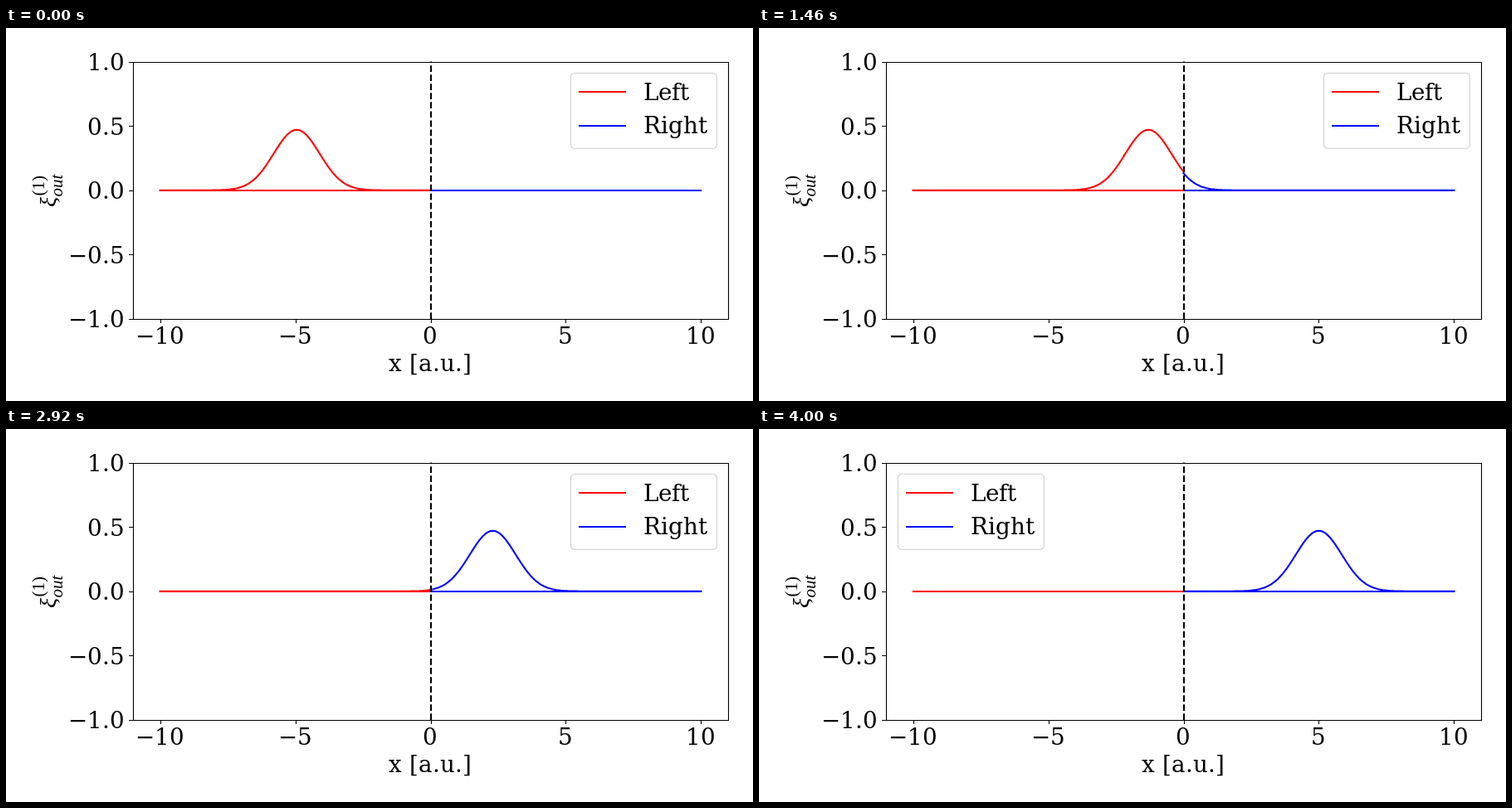
Recreate the animation shown at these times as an HTML page. Size 900 px wide and 450 px high, loop 4.02 s.

```html
<!DOCTYPE html>
<html lang="en">
<head>
<meta charset="utf-8">
<title>Travelling pulse</title>
<style>
html, body { margin: 0; width: 100%; height: 100%; overflow: hidden; background: #fff; }
svg { display: block; }
text { font: 27.78px "DejaVu Serif", "Noto Serif", serif; }
.math text { font-family: "Liberation Serif", serif; font-size: 21px; }
.math .italic { font-style: italic; }
.math .symbol { font-size: 28px; }
.line { fill: none; stroke-width: 2.08; stroke-linecap: square; stroke-linejoin: round; }
.flat { stroke-width: 2; }
.red { stroke: #f00; }
.blue { stroke: #00f; }
</style>
</head>
<body>
<svg width="900" height="450" viewBox="0 0 900 450">
  <path class="line flat red" d="M186 196H512"/>
  <path id="left" class="line red"/>
  <path class="line flat blue" d="M512 196H837"/>
  <path id="right" class="line blue"/>
  <path d="M512 351V40.5" stroke="#000" stroke-width="2" stroke-dasharray="7.71 3.33"/>
  <path d="M153.5 41.5H870.5V351.5H153.5Z" fill="none" stroke="#000" stroke-width="1.11"/>
  <g id="axes" stroke-width="1.11"></g>
  <g class="math" transform="translate(60 216) rotate(-90)">
    <text class="italic symbol">ξ</text>
    <text x="13.5" y="-14.5">(1)</text>
    <text class="italic" x="12.5" y="8">out</text>
  </g>
  <g id="legend">
    <rect x="680.4" y="54.4" width="176" height="91" rx="5" fill="#fff" fill-opacity=".8" stroke="#ccc" stroke-opacity=".8" stroke-width="1.39"/>
    <path class="line flat red" d="M691 77H746"/>
    <path class="line flat blue" d="M691 118H746"/>
    <g id="names"></g>
  </g>
</svg>
<script>
const get = id => document.getElementById(id);
const STEP = 20, COUNT = 201;
const UNIT = 717 / 22, X0 = 511.5, Y0 = 195.75, HALF = 155.25;
const PEAK = Math.sqrt(Math.LN2 / Math.PI);   // unit area, full width 2 at half height

const pen = document.createElement("canvas").getContext("2d");
pen.font = getComputedStyle(document.querySelector("#axes").appendChild(
  document.createElementNS("http://www.w3.org/2000/svg", "text"))).font;

// Text on whole pixels; align is 0 for start, 0.5 for middle, 1 for end.
function label(str, x, y, align = 0) {
  const widths = [...str].map(c => Math.round(pen.measureText(c).width));
  let left = Math.floor(x - align * widths.reduce((a, b) => a + b));
  const xs = widths.map(w => (left += w) - w);
  return `<text x="${xs.join(" ")}" y="${y}">${str}</text>`;
}

const snap = v => Math.floor(v + 0.5) + 0.5;
const number = (v, digits) => (v < 0 ? "\u2212" : "") + Math.abs(v).toFixed(digits);

let marks = label("x [a.u.]", X0, 414, 0.5);
for (let i = -2; i <= 2; i++) {
  const x = X0 + i * 5 * UNIT, y = Y0 - i * HALF / 2;
  marks += `<path d="M${snap(x)} 351v4.9M153 ${snap(y)}h-4.9" stroke="#000"/>`
    + label(number(i * 5, 0), x, 381, 0.5)
    + label(number(i / 2, 1), 143.3, Math.round(y + 10.4), 1);
}
get("axes").innerHTML = marks;
get("names").innerHTML = label("Left", 768.7, 87) + label("Right", 768.7, 127);

// Part of the pulse between two x values; a far-off pulse is a crisp flat line.
function pulse(from, to, center, away) {
  if (away) return `M${Math.round(X0 + from * UNIT)} 196H${Math.round(X0 + to * UNIT)}`;
  const points = [];
  for (let i = 0; i <= 200; i++) {
    const x = from + (to - from) * i / 200;
    const y = PEAK * 2 ** -((x - center) ** 2);
    points.push((X0 + x * UNIT).toFixed(2) + " " + (Y0 - y * HALF).toFixed(3));
  }
  return "M" + points.join("L");
}

function draw(now) {
  const n = Math.floor(now / STEP) % COUNT;
  const center = -5 + n * 0.05, ahead = center + 0.05;
  get("left").setAttribute("d", pulse(-10, 0, ahead, ahead > 4.2));
  get("right").setAttribute("d", pulse(0, 10, center, center < -4.2));
  // The legend jumps aside when the pulse reaches it.
  get("legend").setAttribute("transform", `translate(${n >= 189 ? -513 : 0})`);
}

const start = performance.now();
function loop() {
  draw(performance.now() - start);
  requestAnimationFrame(loop);
}
loop();
</script>
</body>
</html>
```
